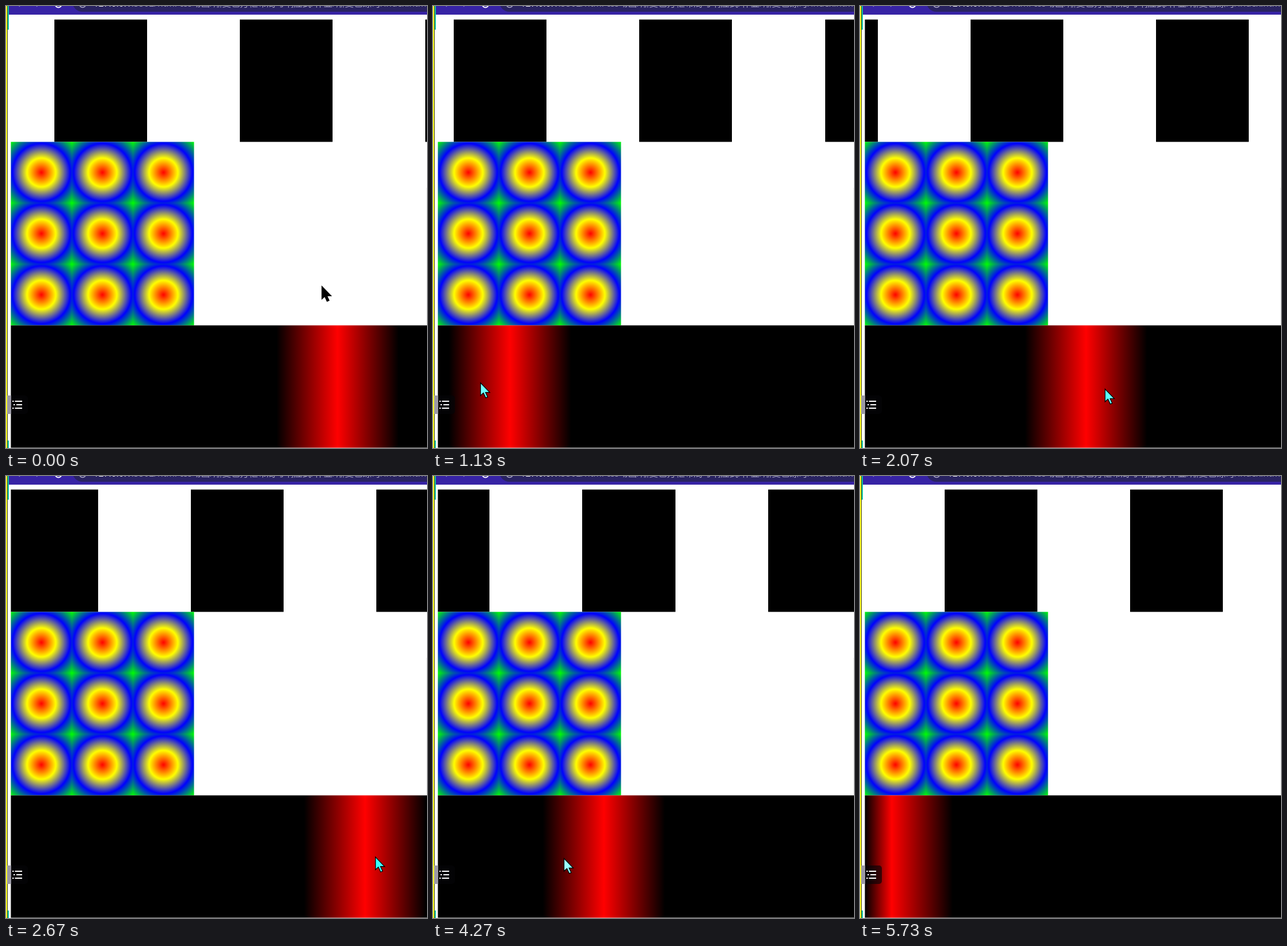
Write an HTML page that moves like this. It is 731 px wide and 766 px high and loops after 5790 ms.

```html
<!DOCTYPE html>
<html lang="zh">
<head>
<meta charset="utf-8">
<title>Gradients</title>
<style>
  html, body { margin: 0; width: 100%; height: 100%; overflow: hidden; background: #fff; }
  #stage { position: absolute; left: 0; top: 0; width: 731px; height: 766px; overflow: hidden; background: #fff; isolation: isolate; }
  #stage > * { position: absolute; }

  #bar { left: 5px; top: 0; width: 726px; height: 14.5px; background: #3723a5; overflow: hidden; }
  #pill { position: absolute; left: 110px; top: -26px; width: 700px; height: 36px; border-radius: 18px; background: #292360; }
  #url { position: absolute; left: 147px; top: -15px; font: 15.5px/20px "Noto Sans", "Noto Sans CJK SC", "Noto Sans CJK", sans-serif; color: #aaa7c4; white-space: nowrap; }
  #url b { color: #fff; font-weight: 500; }
  #bar svg { position: absolute; left: 0; top: 0; }

  #edge { left: 0; top: 0; width: 2px; height: 766px; background: #ffff28; border-right: 1px solid #3b3b20; }
  .tick { left: 3px; width: 2px; background: #10c8a0; }

  /* The page is zoomed: 8px margin, 1520px wide content */
  #page { left: 0; top: 15.1px; transform: scale(1.06); transform-origin: 0 0; }
  #page div { position: absolute; left: 8px; width: 1520px; height: 200px; }
  #stripes { top: 8px;
    background: repeating-linear-gradient(90deg, #000 var(--s), #000 calc(var(--s) + 152px), #fff 0, #fff calc(var(--s) + 304px)); }
  #page #tiles { top: 208px; width: 300px; height: 300px;
    background: radial-gradient(red, yellow, blue, lime) 0 0 / 100px 100px; }
  #glow { top: 508px;
    background: linear-gradient(90deg, #000 0, #000 calc(var(--x) - 100px), red var(--x), #000 calc(var(--x) + 100px)); }
  #side { left: 730px; top: 315px; width: 1px; height: 238px; background: #eee; }

  #menu { left: 2px; top: 675px; width: 36px; height: 32px; border-radius: 0 5px 5px 0; background: rgba(6, 6, 9, .65); }
  #menu::before { content: ""; position: absolute; left: 0; top: 0; width: 6.5px; height: 32px; background: #9b99a5; }
  #menu svg { position: absolute; left: 0; top: 0; }

  .cursor { left: 0; top: 0; overflow: visible; }
  #invert { mix-blend-mode: difference; }
</style>
</head>
<body>
<div id="stage">
  <div id="bar">
    <div id="pill"></div>
    <div id="url"><b>127.0.0.1</b>:5502/html css动画/渐变色方框布局与响应式/作业/渐变色练习/index.html</div>
    <svg width="140" height="12" fill="none" stroke="#fff" stroke-width="2">
      <path d="M15 -3l4 4M48 1l4 -4" stroke="#8f82d4" stroke-width="1.5"/>
      <circle cx="86" cy="-3" r="5.5"/>
      <circle cx="128" cy="-3" r="5.5" stroke="#aaa7c4" stroke-width="1.5"/>
    </svg>
  </div>
  <div id="page">
    <div id="stripes"></div>
    <div id="tiles"></div>
    <div id="glow"></div>
  </div>
  <div id="edge"></div>
  <div class="tick" style="top:0;height:41px"></div>
  <div class="tick" style="top:753px;height:13px"></div>
  <div id="side"></div>
  <div id="menu">
    <svg width="36" height="32" stroke="#fff" stroke-width="2">
      <path d="M9 10h2.5M13.5 10H26M11 16h2.5M16 16h10M9 22h2.5M13.5 22H26"/>
    </svg>
  </div>
  <svg id="invert" class="cursor" width="20" height="30">
    <path id="arrow" d="M0 0V22L5 17.5L9 26L12.5 24.5L8.8 16.5H16Z" fill="#fff"/>
  </svg>
  <svg id="outline" class="cursor" width="20" height="30">
    <path d="M0 0V22L5 17.5L9 26L12.5 24.5L8.8 16.5H16Z" fill="none" stroke="#000" stroke-width="1.3"/>
  </svg>
</div>
<script>
  const LOOP = 5790, STEP = 200 / 3, ZOOM = 1.06, MARGIN = 8;
  const ENTER = 190, LEAVE = 5130; // pointer is over the glow between these

  // Key points: time, position, speed per ms
  const sweep = [[0, 548, .32], [1130, 82, -.78], [2070, 425, .42], [3400, 607, -.42],
    [4270, 227, -1.15], [4800, 69, -.06], [LEAVE, 55, 0], [LOOP, 55, 0]];

  // Key points: time, distance scrolled
  const scroll = [[0, 71], [1130, 938], [2070, 1693], [3400, 2636.6], [4270, 3276.7],
    [4800, 3657.7], [5730, 4386.8]];

  function segment(path, t) {
    const i = Math.max(1, path.findIndex(p => p[0] >= t));
    const a = path[i - 1], b = path[i], span = b[0] - a[0];
    return { a, b, span, k: (t - a[0]) / span };
  }

  function linear(path, t) {
    const { a, b, k } = segment(path, t);
    return a[1] + (b[1] - a[1]) * k;
  }

  function hermite(path, t) {
    const { a, b, span, k } = segment(path, t), j = 1 - k;
    return a[1] * j * j * (1 + 2 * k) + b[1] * k * k * (3 - 2 * k)
      + span * k * j * (a[2] * j - b[2] * k);
  }

  const pointerX = t => hermite(sweep, t);

  // Settles into the lower band, sways a little, then drops off the bottom
  const pointerY = t => 660 - 176 * Math.exp(-t / 300) + 4 * Math.cos((t - 2070) / 400)
    + Math.max(0, t - 4870) * .4;

  // Follows the pointer one step late, and only while it is inside
  const glowX = t => pointerX(Math.min(LEAVE, Math.max(ENTER, t - STEP)));

  const el = id => document.getElementById(id);
  const cursors = [el("invert"), el("outline")];

  function draw(time) {
    // Each pose holds for one fifteenth of a second, rounded to 10 ms
    const t = Math.round(Math.floor((time % LOOP + 4) / STEP) * STEP / 10) * 10;
    el("stripes").style.setProperty("--s", linear(scroll, t) % 304 + "px");
    el("glow").style.setProperty("--x", glowX(t) / ZOOM - MARGIN + "px");
    for (const c of cursors) c.style.transform = `translate(${pointerX(t) + .5}px, ${pointerY(t)}px)`;
  }

  const start = performance.now();
  function tick() {
    draw(performance.now() - start);
    requestAnimationFrame(tick);
  }
  tick();
</script>
</body>
</html>
```
